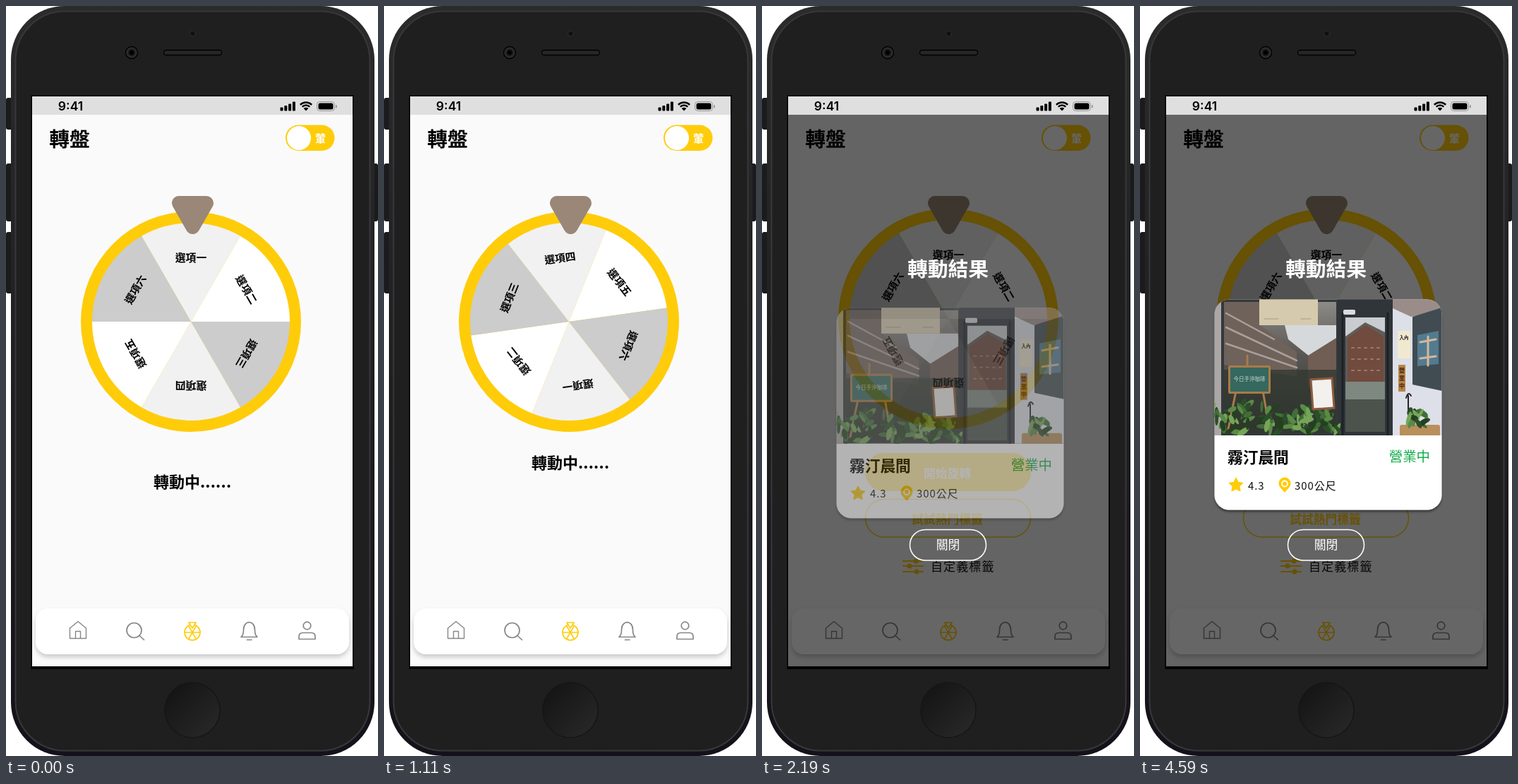
These frames come from a looping animation (527x1062 px, 5.1 s). An HTML page:

```html
<!DOCTYPE html>
<html lang="zh-Hant">
<head>
<meta charset="utf-8">
<title>轉盤</title>
<style>
html, body { margin: 0; width: 100%; height: 100%; overflow: hidden; background: #fff; }
svg { display: block; width: 527px; height: 1062px; }
text { font-family: "Noto Sans CJK TC", "Noto Sans CJK", "Noto Sans", sans-serif; }
.line { fill: none; stroke-linecap: round; stroke-linejoin: round; }
</style>
</head>
<body>
<svg id="stage" viewBox="0 0 527 1062" xmlns="http://www.w3.org/2000/svg"></svg>
<script>
const YELLOW = '#ffcc0a', GREY = '#868686';
const LOOP = 5100, STEP = 30, RESULT_AT = 1800;
const SPIN = 0.8036; // degrees per ms

const rect = (x, y, w, h, fill, r = 0, more = '') =>
  `<rect x="${x}" y="${y}" width="${w}" height="${h}" rx="${r}" fill="${fill}" ${more}/>`;
const circle = (x, y, r, fill, more = '') =>
  `<circle cx="${x}" cy="${y}" r="${r}" fill="${fill}" ${more}/>`;
const shape = (d, fill, more = '') => `<path d="${d}" fill="${fill}" ${more}/>`;
const line = (d, color, width, more = '') =>
  `<path class="line" d="${d}" stroke="${color}" stroke-width="${width}" ${more}/>`;
// Text whose ideographs are centred on cy
const label = (s, x, cy, size, fill = '#000', weight = 700, anchor = 'middle', more = '') =>
  `<text x="${x}" y="${(cy + size * 0.38).toFixed(2)}" font-size="${size}" fill="${fill}" ` +
  `font-weight="${weight}" text-anchor="${anchor}" ${more}>${s}</text>`;

const defs = `<defs>
  <linearGradient id="edge" x1="0" y1="0" x2="0" y2="1">
    <stop offset="0" stop-color="#2b2b2c"/><stop offset=".6" stop-color="#1d1c1f"/><stop offset="1" stop-color="#15111a"/>
  </linearGradient>
  <linearGradient id="home" x1="0" y1="0" x2="1" y2="1">
    <stop offset="0" stop-color="#121212"/><stop offset="1" stop-color="#2a2a2a"/>
  </linearGradient>
  <linearGradient id="glass" x1="0" y1="0" x2="0" y2="1">
    <stop offset="0" stop-color="#8d8b88"/><stop offset=".4" stop-color="#5a5754"/><stop offset="1" stop-color="#2d3230"/>
  </linearGradient>
  <filter id="navShadow" x="-10%" y="-30%" width="120%" height="180%">
    <feDropShadow dx="0" dy="4" stdDeviation="3" flood-opacity=".2"/>
  </filter>
  <filter id="cardShadow" x="-10%" y="-10%" width="120%" height="120%">
    <feDropShadow dx="0" dy="3" stdDeviation="1.5" flood-opacity=".4"/>
  </filter>
  <clipPath id="cardClip"><rect x="105.500" y="415.500" width="322" height="298" rx="21"/></clipPath>
  <clipPath id="photoClip"><rect x="105" y="415" width="323" height="193"/></clipPath>
</defs>`;

function phone() {
  const sideKeys = [[0, 130, 45], [0, 223, 82], [0, 320, 87], [517, 223, 82]];
  return sideKeys.map(([x, y, h]) => rect(x, y, 10, h, '#1b1a1c', 3)).join('') +
    rect(7, 0, 515, 1062, 'url(#edge)', 76) +
    rect(13.500, 7.500, 502, 1047, '#1f1f1f', 70, 'stroke="#38383a" stroke-width="2"') +
    circle(264.500, 39, 4, '#111', 'stroke="#303030"') +
    circle(178, 66, 8.500, '#2b2b2b', 'stroke="#000" stroke-width="1.4"') +
    circle(178, 66, 5, '#161616') + circle(178, 66, 3, '#000') +
    rect(223.500, 62.500, 82, 7, '#262626', 3.500, 'stroke="#000" stroke-width="1.3"') +
    circle(264, 997, 39, 'url(#home)', 'stroke="#161616" stroke-width="1.5"') +
    rect(35.500, 126.500, 457.500, 812.500, '#000') +
    rect(37, 128, 454, 807, '#fafafa');
}

function statusBar() {
  const bars = [5, 7.500, 10, 13].map((h, i) => rect(388.500 + i * 5.800, 148.500 - h, 4, h, '#000', 1)).join('');
  const arc = r => {
    const k = r * Math.SQRT1_2;
    return `M${425 - k} ${148 - k}A${r} ${r} 0 0 1 ${425 + k} ${148 - k}`;
  };
  return rect(37, 128, 454, 26, '#dfdfdf') +
    `<text x="91.500" y="148" font-size="17.500" font-weight="600" text-anchor="middle" style="font-family:Inter,sans-serif">9:41</text>` +
    bars + shape('M425 148.500l-3.300-3.500a4.700 4.700 0 0 1 6.600 0z', '#000') +
    line(arc(7.500), '#000', 2.300, 'style="stroke-linecap:butt"') +
    line(arc(11.500), '#000', 2.400, 'style="stroke-linecap:butt"') +
    rect(440.500, 135.500, 25, 13, 'none', 4, 'stroke="#999"') +
    rect(442.500, 137.500, 21, 9, '#000', 2.500) + rect(467, 140, 1.800, 4.500, '#999', 1);
}

function header() {
  return label('轉盤', 90, 188.500, 28.800) +
    rect(396, 168.500, 69.500, 36.500, YELLOW, 18.250) + circle(415, 187, 17, '#fff') +
    label('葷', 445.500, 187, 15, '#fff');
}

function wheel() {
  const fills = ['#f1f1f1', '#fff', '#ccc'];
  const sectors = [...'一二三四五六'].map((n, i) =>
    `<g transform="rotate(${i * 60})">` +
    shape('M0 0L-70-121.244A140 140 0 0 1 70-121.244Z', fills[i % 3]) +
    label('選項' + n, 0, -91, 14.800) + '</g>').join('');
  return `<g id="wheel">${circle(0, 0, 156, YELLOW)}${sectors}</g>` +
    shape('M245 279H284L264.500 313Z', '#9a8777', 'stroke="#9a8777" stroke-width="20" stroke-linejoin="round"');
}

function waitText() {
  return '<g id="wait">' + [...'轉動中......'].map((c, i) =>
    label(c, i < 3 ? 220 + i * 22 : 278.500 + (i - 3) * 7.400, 674, 22)).join('') + '</g>';
}

function actions() {
  const sliders = [[787, 218], [794, 209], [802, 219]].map(([y, x]) =>
    line(`M200 ${y - 1}H228`, YELLOW, 2.200) + circle(x, y - 1, 3.600, YELLOW)).join('');
  return '<g id="actions">' + rect(146, 633, 235, 54, YELLOW, 27) +
    label('開始旋轉', 262.500, 662, 16.800, '#fff') +
    rect(146.500, 698.500, 234, 53.500, 'none', 26.750, `stroke="${YELLOW}" stroke-width="1.4"`) +
    label('試試熱門標籤', 262.500, 727, 16.800, YELLOW) + sliders +
    label('自定義標籤', 239, 794, 17, '#111', 500, 'start', 'letter-spacing="1.1"') + '</g>';
}

function nav() {
  const spokes = [0, 60, 120].map(a =>
    `<path d="M254 887H274" transform="rotate(${a} 264 887)"/>`).join('');
  return rect(42, 853, 444, 65, '#fff', 18, 'filter="url(#navShadow)"') +
    line('M90.500 881L102 871.500L113.500 881V895.500H90.500ZM98.500 895V885.500H105.500V895', GREY, 1.400) +
    line('M192 884a10.500 10.500 0 1 1-21 0a10.500 10.500 0 1 1 21 0M189 891.500L195.500 897.500', GREY, 1.700) +
    `<g class="line" stroke="${YELLOW}" stroke-width="1.7"><circle cx="264" cy="887" r="11"/>${spokes}` +
    `<path d="M259 873H269L264 881Z" fill="#fff"/></g>` +
    line('M333 893.500Q336.500 891 336.500 883.500C336.500 869 352.500 869 352.500 883.500Q352.500 891 356 893.500ZM341.500 897.500H348', GREY, 1.700) +
    circle(426.500, 877.500, 5.300, 'none', `stroke="${GREY}" stroke-width="1.7"`) +
    line('M415 896.500V893Q415 887.500 420.500 887.500H432.500Q438 887.500 438 893V896.500Z', GREY, 1.700);
}

function leaves() {
  let seed = 11;
  const rnd = () => (seed = seed * 16807 % 2147483647) / 2147483647;
  const greens = ['#2c4d2a', '#3f6e36', '#5a8a45', '#24401f', '#76a558'];
  // centre x, centre y, spread x, spread y, count
  const beds = [[130, 583, 27, 22, 34], [208, 585, 36, 18, 34], [258, 588, 24, 15, 26], [391, 584, 17, 10, 16]];
  return beds.map(([x, y, w, h, n]) => Array.from({ length: n }, (_, i) => {
    const px = x + (rnd() * 2 - 1) * w, py = y + (rnd() * 2 - 1) * h;
    return `<ellipse rx="${(6 + rnd() * 5).toFixed(1)}" ry="${(2 + rnd() * 2).toFixed(1)}" fill="${greens[i % 5]}" ` +
      `transform="translate(${px.toFixed(1)} ${py.toFixed(1)}) rotate(${(rnd() * 180).toFixed(0)})"/>`;
  }).join('')).join('');
}

function photo() {
  const wood = '#a87b48';
  return '<g clip-path="url(#photoClip)">' +
    rect(105, 415, 323, 193, '#34383b') + rect(105, 415, 10, 193, '#aaa7a5') +
    rect(119, 419, 159, 180, 'url(#glass)') +
    shape('M119 419H170V452L222 490V525L119 508Z', '#6e625b') +
    shape('M205 452H278V475L240 496L210 472Z', '#d6d9dc') +
    shape('M278 470L238 495V540H278Z', '#705d53') +
    line('M122 455L222 502M122 478L222 512M122 435L190 472', '#a9a09a', 2.500) +
    rect(119, 515, 159, 90, '#30372f', 0, 'opacity=".75"') +
    rect(169, 415, 83, 37, '#d5caad') + line('M176 443H196M228 443H242', '#a89d83', 1) +
    rect(280, 415, 78, 193, '#30353a') + rect(291, 441, 56, 162, '#5f5d5a') +
    shape('M291 441H347V462L319 448L291 468Z', '#c9ccd0') +
    shape('M294 470L320 452L345 468V532H294Z', '#704b3e') +
    line('M300 484H341M300 500H341M300 516H341', '#9b7a67', 2, 'stroke-dasharray="3 6"') +
    rect(291, 532, 56, 25, '#7e8881') + rect(291, 557, 56, 46, '#4c534c') +
    line('M287 435V608M351 435V608', '#1d2124', 3) + rect(288, 430, 17, 7, '#d9dcdf', 2) +
    rect(358, 415, 70, 193, '#dde0e8') + shape('M358 415H428V431L384 440L358 428Z', '#9a8c88') +
    shape('M386 440L428 427V545L386 536Z', '#414b52') +
    shape('M393 466L423 460V507L393 510Z', '#527b91') + line('M397 476L419 472M397 499L419 496M408 468V509', '#d5b79a', 3) +
    rect(365, 460, 18, 39, '#f1e9cf', 1) + label('入內', 374, 470, 6.500, '#222') +
    rect(366, 508, 10, 38, '#b98345', 1) +
    [...'營業中'].map((c, i) => label(c, 371, 516 + i * 11, 8, '#3c2411')).join('') +
    line('M136 545L124 604M174 545L184 602M152 495V510', wood, 3) +
    rect(126.500, 510.500, 57, 37, '#35685e', 1, `stroke="${wood}" stroke-width="3"`) +
    label('今日手沖咖啡', 155, 528, 7.500, '#c4d9cf', 400) +
    line('M380 552V590M377 555Q380 545 384 552', '#252525', 2) +
    rect(368, 593, 57, 20, '#b98f5c', 3) + leaves() +
    shape('M242 529L272 527L275 569L245 571Z', '#f3f1ee', 'stroke="#8f5b3d" stroke-width="3"') + '</g>';
}

function star(x, y, r) {
  const pts = Array.from({ length: 10 }, (_, i) => {
    const a = i * Math.PI / 5, q = i % 2 ? r * 0.5 : r;
    return `${(x + q * Math.sin(a)).toFixed(2)},${(y - q * Math.cos(a)).toFixed(2)}`;
  });
  return `<polygon points="${pts.join(' ')}" fill="${YELLOW}" stroke="${YELLOW}" stroke-width="1.5" stroke-linejoin="round"/>`;
}

function result() {
  const spaced = 'letter-spacing="0.9"';
  return `<g id="shade">${rect(37, 154, 454, 781, '#000', 0, 'fill-opacity=".6"')}` +
    label('轉動結果', 263.500, 372, 28.800, '#fff') +
    rect(209.500, 741.500, 108, 43.500, 'none', 21.750, 'stroke="#fff" stroke-width="1.5"') +
    label('關閉', 263.500, 763, 16.800, '#fff', 500) + '</g>' +
    `<g id="card">${rect(105.500, 415.500, 322, 298, '#fff', 21, 'filter="url(#cardShadow)"')}` +
    `<g clip-path="url(#cardClip)">${photo()}</g>` +
    label('霧汀晨間', 124, 639, 21.700, '#000', 700, 'start') +
    label('營業中', 411, 638, 19.400, '#12ad4b', 400, 'end') +
    star(136, 678.500, 10) + label('4.3', 153, 679, 15, '#111', 400, 'start', spaced) +
    shape('M205 689C201 684 196.500 681 196.500 676A8.500 8.500 0 0 1 213.500 676C213.500 681 209 684 205 689Z', YELLOW) +
    circle(205, 676.500, 4, 'none', 'stroke="#fff" stroke-width="1.8"') +
    label('300公尺', 219, 679, 15, '#111', 400, 'start', spaced) + '</g>';
}

const $ = id => document.getElementById(id);
$('stage').innerHTML = defs + phone() + header() + wheel() + waitText() + actions() + nav() + result() + statusBar();

const clamp = v => Math.min(1, Math.max(0, v));
const easeOut = u => 1 - (1 - u) ** 2;
const easeInOut = u => u < 0.5 ? 4 * u ** 3 : 1 - 4 * (1 - u) ** 3;
const letters = [...$('wait').children];
const show = (el, on) => el.setAttribute('visibility', on ? 'visible' : 'hidden');

function draw(t) {
  const done = t >= RESULT_AT;
  $('wheel').setAttribute('transform',
    done ? 'translate(264 443)' : `translate(262 447) rotate(${t * SPIN % 360})`);
  show($('wait'), !done);
  show($('actions'), done);
  letters.forEach((el, i) => {
    const rise = easeInOut(clamp((t % 600 - i * 18) / 300));
    el.setAttribute('transform', `translate(0 ${-27 * rise})`);
  });
  $('shade').setAttribute('opacity', easeOut(clamp((t - RESULT_AT) / 270)));
  const enter = easeOut(clamp((t - 2100) / 300));
  $('card').setAttribute('opacity', enter);
  $('card').setAttribute('transform', `translate(0 ${24 * (1 - enter)})`);
}

const start = performance.now();
function tick() {
  const t = (performance.now() - start) % LOOP;
  draw(Math.floor(t / STEP) * STEP);
  requestAnimationFrame(tick);
}
tick();
</script>
</body>
</html>
```
